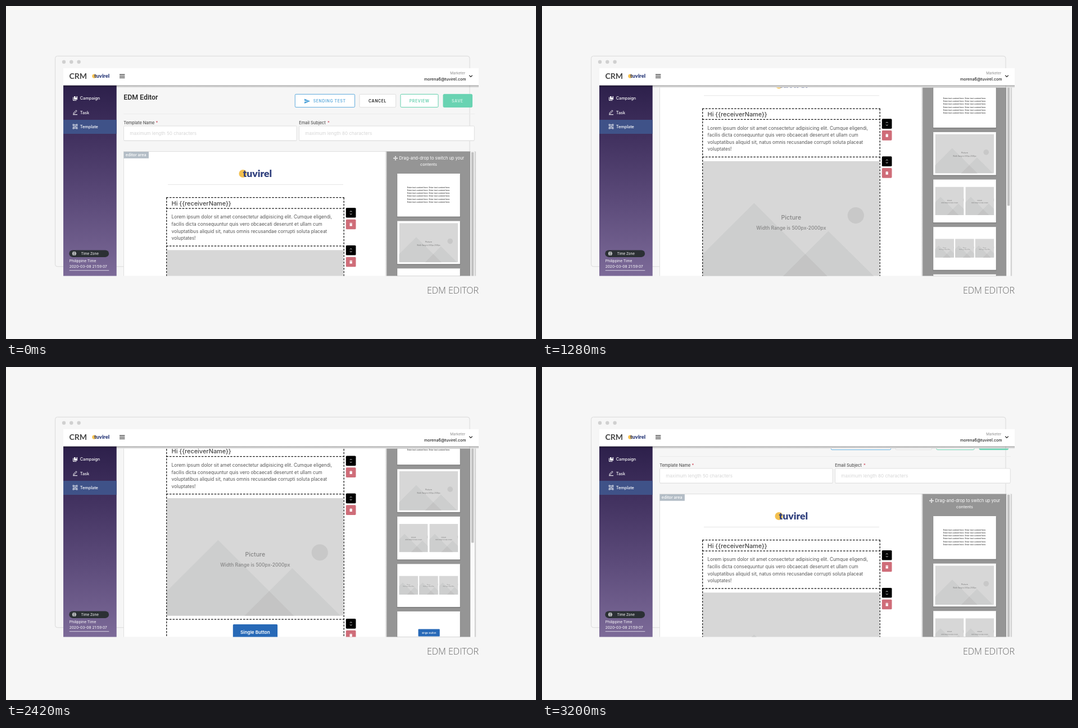
Write an HTML page that moves like this. It is 943x594 px and loops after 3.32 s.

```html
<!DOCTYPE html>
<html lang="en">
<head>
<meta charset="utf-8">
<title>EDM Editor</title>
<style>
  html, body { margin: 0; width: 100%; height: 100%; overflow: hidden; background: #f6f6f6; }
  svg { display: block; }
  text { font-family: Inter, sans-serif; white-space: pre; }
</style>
</head>
<body>
<svg id="stage" width="943" height="594" viewBox="0 0 943 594"></svg>
<script>
const LOOP = 3320;

const rect = (x, y, w, h, fill, more = '') =>
  `<rect x="${x}" y="${y}" width="${w}" height="${h}" fill="${fill}" ${more}/>`;
const line = (x1, y1, x2, y2, color, more = '') =>
  `<path d="M${x1} ${y1}L${x2} ${y2}" stroke="${color}" fill="none" ${more}/>`;
const circle = (x, y, r, fill) => `<circle cx="${x}" cy="${y}" r="${r}" fill="${fill}"/>`;
const path = (d, more) => `<path d="${d}" ${more}/>`;
const text = (x, y, size, fill, str, more = '') =>
  `<text x="${x}" y="${y}" font-size="${size}" fill="${fill}" ${more}>${str}</text>`;
const at = (x, y, inner) => `<g transform="translate(${x} ${y})">${inner}</g>`;

const MEDIUM = 'font-weight="500"';
const SEMI = 'font-weight="600"';
const MID = 'text-anchor="middle"';
const END = 'text-anchor="end"';
const stroke = (color, width = 1) => `fill="none" stroke="${color}" stroke-width="${width}"`;

// Brand: plain dot and stand-in word
const brand = (x, y, size) =>
  circle(x, y - size * 0.31, size * 0.4, '#f3c04f') +
  text(x, y, size, '#2f3f7d', 'tuvirel', 'font-weight="900" style="font-family:Lato,sans-serif"');

// Placeholder picture, 314 x 210, cropped to the given box
const picture = (x, y, w, h) =>
  `<svg x="${x}" y="${y}" width="${w}" height="${h}" viewBox="0 0 314 210" preserveAspectRatio="xMidYMid slice">` +
  rect(0, 0, 314, 210, '#d7d7d7') +
  path('M91 75L226 210H-44Z', 'fill="#cdcece"') +
  path('M223 125L309 210H138Z', 'fill="#cdcece"') +
  path('M182 166L226 210H138Z', 'fill="#c4c4c4"') +
  circle(272, 97, 14.6, '#c8c8c8') +
  text(157, 104, 10.6, '#858585', 'Picture', MID + ' ' + MEDIUM) +
  text(157, 122, 8.5, '#858585', 'Width Range is 500px-2000px', MID + ' ' + MEDIUM) +
  '</svg>';

function frame() {
  return rect(0, 0, 943, 594, '#f6f6f6') +
    rect(87.5, 89.3, 737.5, 375.5, 'none', 'rx="4" stroke="#dadada"') +
    [103, 116.3, 129.6].map(x => circle(x, 99.8, 3.2, '#d0d0d0')).join('') +
    text(841, 512.7, 16, '#666', 'EDM EDITOR',
      END + ' font-weight="300" style="font-family:\'Open Sans\',sans-serif"');
}

function header() {
  return rect(102, 141, 739, 5, 'url(#shade)') +
    rect(102, 111, 739, 30.5, '#fff') +
    text(112.6, 130, 14, '#444', 'CRM', 'font-weight="700" style="font-family:Lato,sans-serif"') +
    brand(157, 128, 9.3) +
    [122.2, 125.1, 128].map(y => line(202, y, 211.4, y, '#222', 'stroke-width="1.2"')).join('') +
    text(817, 122, 6.3, '#8c8c8c', 'Marketer', END) +
    text(818.5, 132.6, 7.05, '#222', 'morena6@tuvirel.com', END + ' ' + MEDIUM) +
    path('M824.2 123.6L827 126.4L829.8 123.6', stroke('#222', 1.3));
}

function sidebar() {
  const item = (y, label) => text(131.7, y, 7.3, '#fff', label, MEDIUM);
  const campaign = path('M2 0H8V6H2Z', 'fill="#fff"') +
    path('M.5 1.6V7.5H6.4', stroke('#fff')) + path('M4.6 0H6.6V3L5.6 2.2L4.6 3Z', 'fill="#3a2b5c"');
  const pencil = path('M.8 6.4L1.2 4.8L5.8 .3L7.2 1.6L2.5 6.2Z', stroke('#fff', .9)) +
    line(0, 8, 8, 8, '#fff', 'stroke-width="1.1"');
  const corners = [[0, 0], [6, 0], [0, 6], [6, 6]]
    .map(([x, y]) => rect(x, y, 2, 2, 'none', 'stroke="#fff" stroke-width=".7"')).join('');
  const shapes = corners + path('M2 1H6M2 7H6M1 2V6M7 2V6', stroke('#fff', .8)) +
    path('M2.6 5.8L4 2.4L5.4 5.8M3 4.7H5', stroke('#fff', .7));
  const globe = circle(0, 0, 3.5, '#fff') +
    path('M-3.4 -1.2H3.4M-3.4 1.2H3.4M0 -3.4V3.4', stroke('#2b3034', .5)) +
    `<ellipse rx="1.6" ry="3.4" ${stroke('#2b3034', .5)}/>`;
  return rect(102, 141.5, 94.7, 340, 'url(#night)') +
    rect(102, 203, 94.7, 25, '#3f5288') +
    at(119, 161, campaign) + item(167.4, 'Campaign') +
    at(119, 185.7, pencil) + item(192.5, 'Task') +
    at(119, 211, shapes) + item(217.7, 'Template') +
    rect(112.3, 435.5, 70.8, 12.4, '#2b3034', 'rx="6.2"') +
    at(121.4, 441.6, globe) +
    text(133.7, 443.9, 6.2, '#fff', 'Time Zone') +
    text(112.7, 457.3, 6.6, '#fff', 'Philippine Time') +
    text(112.7, 467.4, 6.6, '#fff', '2020-03-08 21:59:07') +
    line(112.7, 471.7, 183.3, 471.7, '#e4dfec', 'stroke-width=".9"');
}

function toolbar() {
  const button = (x, w, edge, color, label, tx, fill = '#fff') =>
    rect(x, 157.4, w, 23.2, fill, `rx="1.8" stroke="${edge}"`) +
    text(tx, 171.9, 6.9, color, label, SEMI + ' letter-spacing=".62"');
  return text(209.2, 167, 12.35, '#222', 'EDM Editor', MEDIUM + ' style="font-family:Roboto,sans-serif"') +
    button(514.3, 106.3, '#5fabdc', '#5fabdc', 'SENDING TEST', 546.7) +
    path('M531 165.6L541.2 169.8L531 174V170.7L538.2 169.8L531 168.9Z', 'fill="#4aa0d8"') +
    button(629, 64.6, '#dedede', '#222', 'CANCEL', 645) +
    button(702, 67, '#62cfac', '#62cfac', 'PREVIEW', 717.8) +
    button(778, 51.5, '#69d3b2', '#d3f3e8', 'SAVE', 793.1, '#69d3b2') +
    line(209, 192.5, 834, 192.5, '#ececec');
}

function fields() {
  const field = (x, w, label, starX, hint) =>
    text(x - .3, 211.2, 7.4, '#555', label, MEDIUM) +
    text(starX, 211.2, 7.4, '#cc4455', '*', MEDIUM) +
    rect(x, 215, w, 26, '#e9e9e9', 'rx="1.5"') +
    rect(x, 214, w, 26, '#fff', 'rx="1.5" stroke="#dcdcdc" stroke-width=".9"') +
    text(x + 10.8, 230.2, 8.15, '#d6d6d6', hint);
  return field(209.5, 307.8, 'Template Name', 266.6, 'maximum length 50 characters') +
    field(521.5, 311.8, 'Email Subject', 572, 'maximum length 80 characters');
}

function tools(y) {
  const trash = path('M-2.5 -2.2H2.5V-1.4H-2.5ZM-1 -2.8H1V-2H-1ZM-2.1 -1H2.1V2.9H-2.1Z', 'fill="#fff"');
  return rect(604.8, y, 17.7, 17.6, '#000', 'rx="1.6"') +
    at(613.7, y + 8.8, path('M-1.7 -1.5L0 -3.2L1.7 -1.5M-1.7 1.5L0 3.2L1.7 1.5', stroke('#fff', .9))) +
    rect(604.8, y + 20.7, 17.7, 17.6, '#cf6d79', 'rx="1.6"') +
    at(613.7, y + 29.5, trash);
}

function editor() {
  const dash = 'stroke-width="1.25" stroke-dasharray="3.5 2.2"';
  const prose = [
    'Lorem ipsum dolor sit amet consectetur adipisicing elit. Cumque eligendi,',
    'facilis dicta consequuntur quis vero obcaecati deserunt et ullam cum',
    'voluptatibus aliquid sit, natus omnis recusandae corrupti soluta placeat',
    'voluptates!'
  ].map((s, i) => text(294.6, 379.4 + 12.55 * i, 8.26, '#555', s)).join('');
  return rect(209.5, 259.5, 624.5, 700, '#fff', 'stroke="#dcdcdc" stroke-width=".9"') +
    rect(209.5, 260, 44.4, 11.7, '#b3bdc6') +
    text(212.8, 268.2, 7.15, '#fff', 'editor area', MEDIUM) +
    brand(421.5, 304.5, 17.6) +
    line(288, 318.5, 600, 318.5, '#e4e4e4', 'stroke-width=".9"') +
    text(294.6, 355.6, 10.9, '#444', 'Hi {{receiverName}}', MEDIUM) +
    prose +
    picture(286.3, 435.2, 314, 210) +
    rect(403.8, 660.5, 79.3, 27, '#2769b7', 'rx="1.6"') +
    text(443.4, 677.2, 8.2, '#fff', 'Single Button', MID + ' ' + SEMI) +
    [341.7, 361, 428, 651.6, 696.5].map(y => line(285.2, y, 601.8, y, '#111', dash)).join('') +
    [285.7, 601.2].map(x => line(x, 341.7, x, 696.5, '#111', dash)).join('') +
    [360, 427, 650.5].map(tools).join('');
}

function panel() {
  const cardY = i => 299 + 84.6 * i;
  const card = i => rect(695.5, cardY(i) + .8, 113, 77.3, '#6f6f6f', 'opacity=".6"') +
    rect(696.2, cardY(i), 111.6, 76.6, '#fff');
  const move = path('M-3.4 0H3.4M0 -3.4V3.4', stroke('#fff', 1)) +
    path('M-4 0L-2.4 -1.5V1.5ZM4 0L2.4 -1.5V1.5ZM0 -4L-1.5 -2.4H1.5ZM0 4L-1.5 2.4H1.5Z', 'fill="#fff"');
  const copy = 'Enter text content here. Enter text content here.';
  let out = rect(674, 259.5, 3.5, 700, 'url(#fadeL)') +
    rect(834, 259.5, 3, 700, 'url(#fadeR)') +
    rect(826, 259.5, 8, 700, '#fafafa') +
    rect(677.3, 259.5, 148.9, 700, '#959595') +
    rect(827.9, 260.8, 4.5, 254, '#c1c1c1', 'rx=".8"') +
    at(693, 271.6, move) +
    text(699.4, 274.2, 7.45, '#fff', 'Drag-and-drop to switch up your') +
    text(752, 285.1, 7.3, '#fff', 'contents', MID);
  for (let i = 0; i < 6; i++) out += card(i);
  for (let i = 0; i < 6; i++) out += text(752, 324.7 + 5.2 * i, 3.38, '#333', copy, MID + ' ' + MEDIUM);
  out += picture(699.6, 387.2, 104.6, 70);
  for (let i = 0; i < 2; i++) out += picture(699.8 + 53.8 * i, 481.2, 50.5, 50.5);
  for (let i = 0; i < 3; i++) out += picture(699.6 + 35.6 * i, 573.9, 33.4, 33.6);
  return out + rect(733.5, 669, 38.2, 12.9, '#2769b7', 'rx=".8"') +
    text(752.6, 677, 4.05, '#fff', 'Single Button', MID + ' ' + MEDIUM);
}

const ramp = (id, dir, stops) => `<linearGradient id="${id}" x1="0" y1="0" ${dir}>` +
  stops.map(([o, c, a = 1]) => `<stop offset="${o}" stop-color="${c}" stop-opacity="${a}"/>`).join('') +
  '</linearGradient>';
const DOWN = 'x2="0" y2="1"', RIGHT = 'x2="1" y2="0"';

const stage = document.getElementById('stage');
stage.innerHTML = '<defs>' +
  ramp('night', DOWN, [[0, '#2d204b'], [.27, '#41315f'], [.6, '#5b4a79'], [1, '#7c6a98']]) +
  ramp('shade', DOWN, [[0, '#000', .42], [.4, '#000', .2], [1, '#000', 0]]) +
  ramp('fadeL', RIGHT, [[0, '#000', 0], [1, '#000', .2]]) +
  ramp('fadeR', RIGHT, [[0, '#000', .2], [1, '#000', 0]]) +
  '<clipPath id="view"><rect x="196.7" y="145.6" width="644.3" height="336"/></clipPath></defs>' +
  frame() +
  `<g clip-path="url(#view)"><g id="page">${toolbar() + fields() + editor() + panel()}</g></g>` +
  sidebar() + header();
const page = document.getElementById('page');

// The page scrolls in discrete ticks: down, hold, back up
const DOWN_TICKS = [720, 840, 940, 1060, 1160, 1280, 1400, 1500, 1620];
const UP_TICKS = [2420, 2540, 2640, 2760, 2880, 2980, 3100, 3200];
const passed = (ticks, t) => ticks.filter(k => t >= k).length;

function scrollAt(t) {
  const up = passed(UP_TICKS, t);
  if (up) return 201.4 - 24.06 * (up - 1);
  const down = passed(DOWN_TICKS, t);
  return down ? 33 + 25.13 * (down - 1) : 0;
}

const start = performance.now();
function draw() {
  const t = (performance.now() - start) % LOOP;
  page.setAttribute('transform', `translate(0 ${-scrollAt(t)})`);
  requestAnimationFrame(draw);
}
draw();
</script>
</body>
</html>
```
